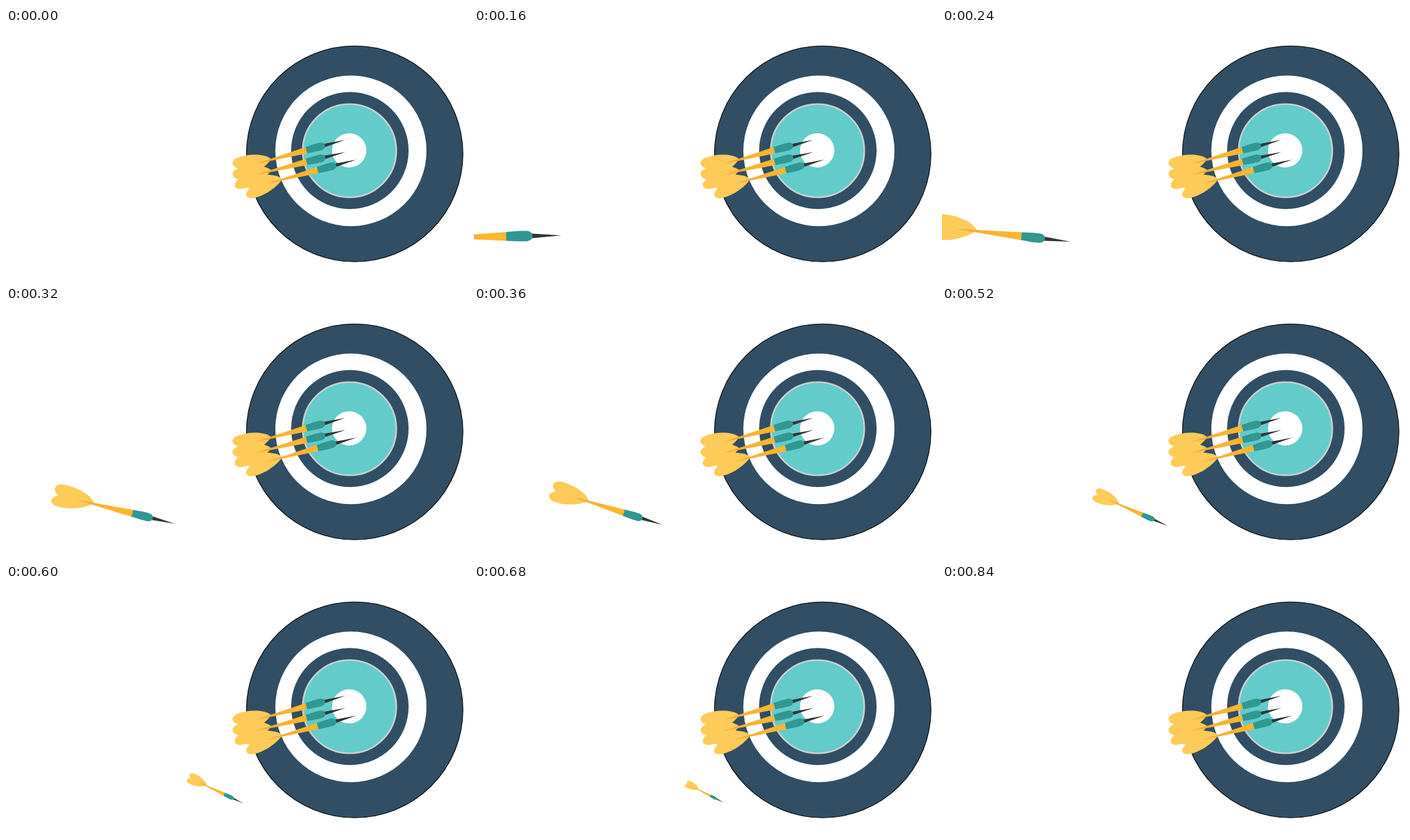
An HTML page with a canvas that plays this animation: 700x380 px, repeating every 880 ms.

```html
<!DOCTYPE html>
<html lang="en">
<head>
<meta charset="utf-8">
<title>Darts</title>
<style>
  html, body { margin: 0; width: 100%; height: 100%; overflow: hidden; background: #fff; }
  canvas { display: block; }
</style>
</head>
<body>
<canvas id="stage" width="700" height="380"></canvas>
<script>
const ctx = document.getElementById('stage').getContext('2d');

const STEP = 40;
const STEPS = 22;
const HALF = 92.5; // distance from a dart's middle to its tip
const NAVY = '#314e64';

// Dart outline, pointing right, with the tip at the origin.
const FINS = new Path2D(
  'M-125.5-1C-132-12-157-19-176-17.5C-190-17-193-6-181 0' +
  'C-194 6-192 17-175.5 17C-157 17-137 9-125.5-1Z');
const SHAFT = new Path2D('M-153 0L-65.5-5.3V5.3Z');
const GRIP = new Path2D(
  'M-66-5.3L-51-6.3H-42C-37-6-34.5-3.5-34.5 0C-34.5 3.5-37 6-42 6.3H-51L-66 5.3Z');
const NEEDLE = new Path2D('M-35-2.8L0 0L-35 2.8Z');

const shaftFill = ctx.createLinearGradient(-153, 0, -64, 0);
shaftFill.addColorStop(0, '#f39a35');
shaftFill.addColorStop(0.4, '#fbb030');
shaftFill.addColorStop(1, '#fdb82e');

// Flight poses by step: middle of the dart, scale and angle in degrees.
const FLIGHT = [
  { at: 1, x: -97.6, y: 323.6, scale: 1.465, angle: -12 },
  { at: 10, x: 240.8, y: 304.6, scale: 0.872, angle: 21.1 },
  { at: 19, x: 381.3, y: 321.5, scale: 0.185, angle: 29 }
];
const GONE = 21;

function disc(x, y, r, fill, stroke, width) {
  ctx.beginPath();
  ctx.arc(x, y, r, 0, Math.PI * 2);
  ctx.fillStyle = fill;
  ctx.fill();
  if (stroke) {
    ctx.strokeStyle = stroke;
    ctx.lineWidth = width;
    ctx.stroke();
  }
}

function paint(path, fill) {
  ctx.fillStyle = fill;
  ctx.fill(path);
}

function dart(tipX, tipY, scale, angle) {
  ctx.save();
  ctx.translate(tipX, tipY);
  ctx.rotate(angle * Math.PI / 180);
  ctx.scale(scale, scale);
  paint(FINS, '#ffcb58');
  paint(SHAFT, shaftFill);
  paint(NEEDLE, '#353538');
  paint(GRIP, '#309793');
  ctx.restore();
}

function board() {
  disc(528.3, 191.2, 164, NAVY, '#000', 1.1);
  disc(522.6, 186.8, 114.5, '#fff');
  disc(521, 186.2, 89, NAVY);
  disc(520.5, 186.5, 70.8, '#63cbc9', '#c8cfd2', 2.6);
  disc(520, 186, 26, '#fff');
}

function flyingDart(step) {
  if (step < FLIGHT[0].at || step >= GONE) return;
  const [a, b] = step < FLIGHT[1].at ? FLIGHT : FLIGHT.slice(1);
  const k = Math.min(1, (step - a.at) / (b.at - a.at));
  const mix = key => a[key] + (b[key] - a[key]) * k;
  const scale = mix('scale');
  const angle = mix('angle');
  const turn = angle * Math.PI / 180;
  const reach = HALF * scale;
  dart(mix('x') + reach * Math.cos(turn), mix('y') + reach * Math.sin(turn), scale, angle);
}

function draw(now) {
  const step = Math.floor(now / STEP) % STEPS;
  ctx.fillStyle = '#fff';
  ctx.fillRect(0, 0, 700, 380);
  board();
  dart(514, 170, 0.925, -15);
  dart(514.5, 188.5, 0.925, -14.3);
  dart(531, 200, 0.925, -15.2);
  flyingDart(step);
}

let start;
function tick(now) {
  start ??= now;
  draw(now - start);
  requestAnimationFrame(tick);
}
draw(0);
requestAnimationFrame(tick);
</script>
</body>
</html>
```
